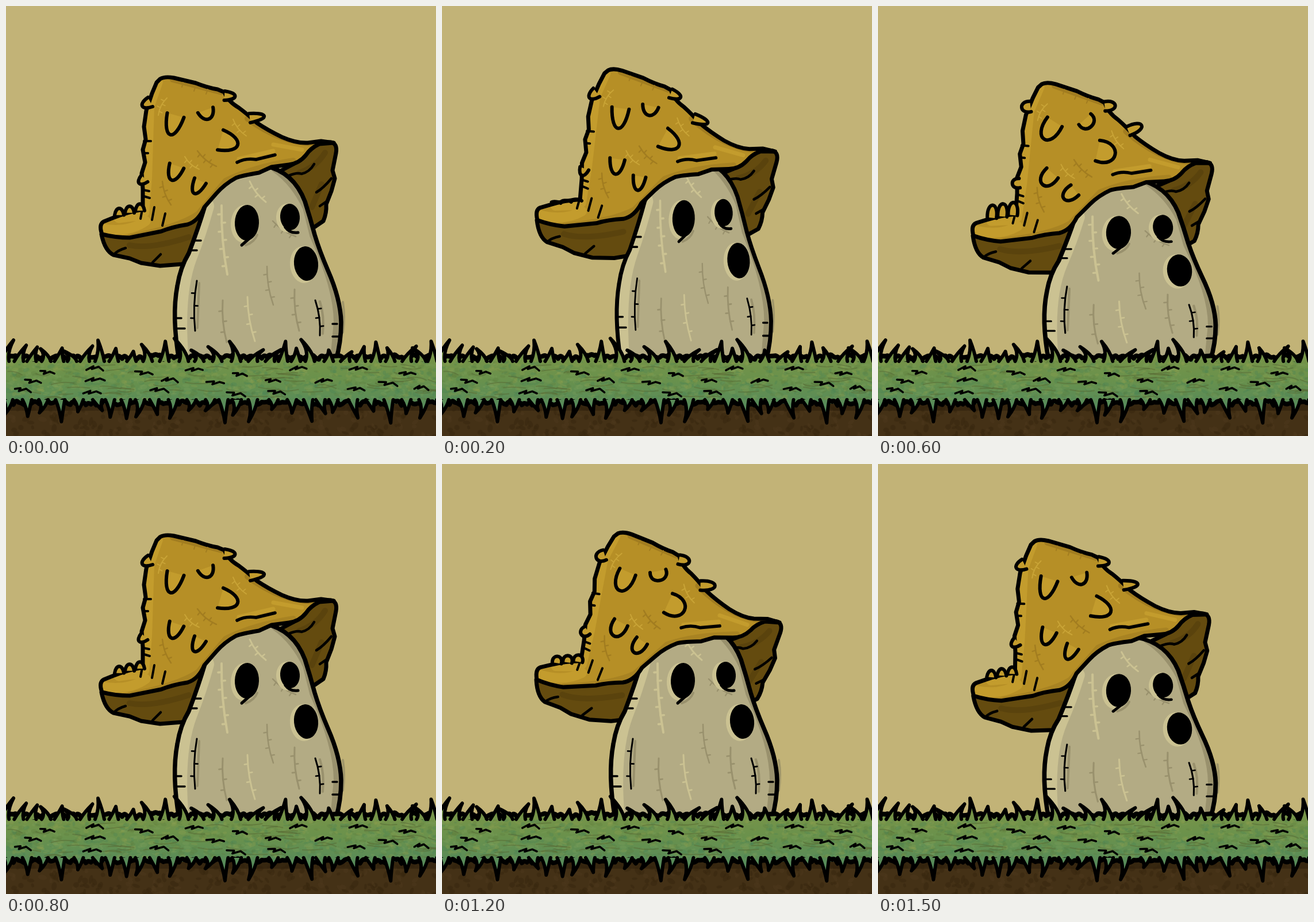
These frames come from a looping animation (748 px wide and 748 px high, 1.6 s). An HTML page with a canvas:

```html
<!DOCTYPE html>
<html lang="en">
<head>
<meta charset="utf-8">
<title>Bouncing mushroom</title>
<style>
html, body { margin: 0; height: 100%; overflow: hidden; background: #c2b377; }
canvas { display: block; }
</style>
</head>
<body>
<canvas id="stage" width="748" height="748"></canvas>
<script>
const SIZE = 748, STEP = 100, STEPS = 8;
const view = document.getElementById('stage').getContext('2d');
let g = view;

const fill = (d, color) => { g.fillStyle = color; g.fill(new Path2D(d)); };
const line = (d, width, color = '#000') => {
  g.lineWidth = width;
  g.lineCap = g.lineJoin = 'round';
  g.strokeStyle = color;
  g.stroke(new Path2D(d));
};
const oval = (x, y, rx, ry, color, turn = 0) => {
  g.fillStyle = color;
  g.beginPath();
  g.ellipse(x, y, rx, ry, turn, 0, 7);
  g.fill();
};
// Runs paint() and puts the transform and clip back afterwards.
const scoped = paint => { g.save(); paint(); g.restore(); };

// A bent scratch with short ticks on alternating sides.
function crack(x1, y1, x2, y2, color, ticks = 4, width = 3) {
  const dx = x2 - x1, dy = y2 - y1, len = Math.hypot(dx, dy);
  const nx = -dy / len, ny = dx / len;
  line(`M${x1} ${y1}Q${x1 + dx / 2 + nx * 6} ${y1 + dy / 2 + ny * 6} ${x2} ${y2}`, width, color);
  for (let i = 1; i <= ticks; i++) {
    const p = i / (ticks + 1), side = i % 2 ? 6 : -6, bend = 12 * p * (1 - p);
    line(`M${x1 + dx * p + nx * bend} ${y1 + dy * p + ny * bend}l${nx * side} ${ny * side}`, width * .9, color);
  }
}

// The body holds each scale for two steps: middle, tall, middle, squashed.
const bodyScale = step => [[1, 1], [.928, 1.03], [1, 1], [1.03, .93]][step >> 1];

// Peak, left brim and right tip circle once per cycle; the tip also rides on the body.
function hatFrame(step) {
  const angle = step / STEPS * 2 * Math.PI, c = Math.cos(angle), s = Math.sin(angle);
  const drop = (1 - bodyScale(step)[1]) * 320;
  const px = 288 - 19 * c + 2 * s, py = 124 + 3 * c - 12 * s;
  const lx = 165 + c, ly = 386 + 11 * c - 13.5 * s;
  const tx = 581 - 8.5 * c + s, ty = 257 - 19 * c + 6 * s + drop;
  return new DOMMatrix([tx - px, ty - py, lx - px, ly - py, px, py]);
}
const restInverse = hatFrame(0).inverse();

const cap = 'M268 127Q276 122 292 125L330 134Q350 142 368 145L380 150Q386 166 405 177Q420 188 436 203Q455 216 480 228Q505 239 525 238L548 235L570 238L545 240Q530 247 522 259Q510 274 492 276L462 280L440 290Q410 295 400 299Q380 310 366 326L345 350Q335 374 316 380Q290 384 270 392L215 403Q190 403 167 397Q161 380 170 375L185 369Q212 358 238 354L238 318L236 291L242 272L238 250L243 232L240 210L244 182L254 152L262 133Z';
const underside = 'M166 397Q172 426 187 433L215 439L235 447L268 452L306 449L530 389L552 374Q558 360 557 345L566 322L572 300L568 286L574 256Q577 239 565 237L545 237L500 275L300 380Z';
const bodyShape = 'M301 616Q288 540 298 487Q303 455 318 430Q335 385 346 348Q385 270 450 278Q500 288 520 340Q529 368 537 398Q545 425 560 460Q582 510 583 550Q583 585 574 616';
const LIGHT = '#cbc292', SHADE = '#99916d', GOLD = '#b68f26', GLOW = '#c39c2d', DUSK = '#a27d20';

function drawUnderside() {
  fill(underside, '#644b0f');
  line('M215 416Q250 424 318 402M510 290Q540 280 555 255M549 310L532 350', 10, '#5a430d');
  line(underside, 7);
  line('M187 433Q194 425 208 421M255 446L269 432M490 296Q506 289 514 292Q528 289 536 275M540 324Q552 317 566 300M546 348L559 339', 4.5);
}

function eye(x, y, rx, ry, turn) {
  oval(x - 5, y + 2, rx + 2, ry + 2, LIGHT, turn);
  oval(x, y, rx, ry, '#000', turn);
}

function drawBody() {
  line('M586 515Q590 540 586 568', 4, '#a0966a');
  fill(bodyShape, '#b3ab84');
  scoped(() => {
    g.clip(new Path2D(bodyShape));
    line('M348 348Q335 395 319 435Q294 500 304 616', 28, LIGHT);
    line('M470 280Q505 305 526 350L538 398Q580 490 580 550L574 616', 20, SHADE);
  });
  line(bodyShape, 7.5);

  crack(375, 347, 385, 467, LIGHT, 7, 4);
  crack(424, 305, 452, 341, LIGHT, 4);
  crack(420, 506, 433, 583, LIGHT, 4);
  crack(454, 453, 465, 520, SHADE, 4, 2.5);
  crack(377, 512, 384, 585, SHADE, 3);
  crack(502, 493, 510, 565, SHADE, 4);
  crack(464, 374, 504, 401, SHADE, 5, 2.5);
  line('M336 482L333 560M546 514Q554 538 551 570', 4, SHADE);
  crack(332, 478, 329, 565, '#000', 3);
  crack(546, 573, 538, 512, '#000', 3);
  line('M326 408h13M323 425h9M296 543h9M297 561h14M576 553h-8M580 575h-12', 3.5);

  eye(419, 377, 21, 31, .04);
  eye(494, 367, 17, 23, -.08);
  eye(522, 448, 21, 30, -.1);
  line('M437 398Q432 411 417 416', 4, SHADE);
  line('M426 402L410 416M486 385Q494 396 508 394', 5);
}

// Flaps on the hat: root x, y, half width, length, resting angle, swing per lift.
const flaps = [
  [295, 190, 15, 36, 0, 1], [347, 181, 14, 17, 10, -2], [373, 233, 18, 32, -65, -.6],
  [297, 278, 13, 27, 0, 1.3], [338, 304, 11, 25, 0, 1.7],
  [380, 156, 8, 19, -72, -1], [424, 195, 8, 26, -75, -1.5],
  [251, 167, 9, 16, 45, 1.2], [241, 300, 8, 13, 10, 2.5]
];
function drawFlap(x, y, half, length, degrees, pinch) {
  const d = `M${-half} 0C${-half * pinch} ${length * 1.3} ${half * pinch} ${length * 1.3} ${half} 0`;
  scoped(() => {
    g.translate(x, y);
    g.rotate(degrees * Math.PI / 180);
    fill(d, GLOW);
    line(d, 6);
  });
}

function drawCap() {
  fill(cap, GOLD);
  scoped(() => {
    g.clip(new Path2D(cap));
    line('M266 132L251 175L247 300L242 360', 14, GLOW);
    line('M172 388Q215 394 243 374M196 369L235 364', 17, GLOW);
    line('M290 128L375 150M420 196Q480 240 538 239', 10, DUSK);
    line('M215 402Q300 385 334 362L382 304Q430 280 500 269', 10, '#a88322');
    line('M405 266L465 252M465 241L515 250', 7, GLOW);
  });
  line(cap, 7);
  crack(280, 160, 265, 190, '#c9a437', 4, 2);
  crack(311, 262, 336, 284, '#c9a437', 4, 2);
  crack(395, 197, 418, 226, '#c9a437', 4, 2);
  crack(333, 252, 366, 279, DUSK, 5, 2.5);
  crack(272, 305, 287, 346, DUSK, 4, 2.5);
  line('M308 133l-2 8M330 139l-3 9M351 145l-3 8', 2, DUSK);
  line('M402 272Q417 264 435 267L468 259', 5.5);
  line('M240 235h12M240 256h7M239 320l10 2M240 331l10 3M239 344L234 370M258 350L254 372M277 361L272 382', 4);
}

function drawHat(step) {
  // Flaps hold for two steps, one step ahead of the body: they lift as the hat falls.
  const pair = (step + 1 >> 1) % 4;
  const lift = 15 - 13 * Math.sin(pair * Math.PI / 2);
  const pinch = pair < 2 ? .7 : 1.3;
  drawCap();
  for (const [x, y, half, length, rest, swing] of flaps)
    drawFlap(x, y, half, length, rest + lift * swing, pinch);
  for (let x = 197; x < 236; x += 18)
    drawFlap(x, 405 - x * .21, 8, lift * .8, 180, pinch);
}

function makeGround() {
  const layer = document.createElement('canvas');
  layer.width = layer.height = SIZE;
  g = layer.getContext('2d');
  let seed = 11;
  const rnd = (a, b) => {
    seed = seed * 16807 % 2147483647;
    return a + (b - a) * seed / 2147483647;
  };
  const green = g.createLinearGradient(0, 605, 0, 695);
  green.addColorStop(0, '#789448');
  green.addColorStop(.5, '#69914c');
  green.addColorStop(1, '#578b5a');

  g.fillStyle = '#443116';
  g.fillRect(0, 685, SIZE, 63);
  for (let i = 0; i < 260; i++)
    oval(rnd(0, SIZE), rnd(692, 750), rnd(2, 8), rnd(2, 5), i % 3 ? '#38270f88' : '#4c391c88', rnd(0, 3));
  line('M0 698H748', 12, '#2f200d99');

  const rough = y => {
    let d = `M-5 ${y}`;
    for (let x = -5; x < SIZE; x += 9) d += `Q${x + 4} ${y + rnd(-8, 3)} ${x + 9} ${y + rnd(-3, 4)}`;
    return d;
  };
  const top = rough(611), bottom = rough(691);
  fill(top + 'L755 692L-5 692Z', green);
  const tints = ['#93a04f44', '#44805544', '#7ea35c44', '#5c7c3b44'];
  for (let i = 0; i < 1000; i++)
    oval(rnd(0, SIZE), rnd(617, 688), rnd(2, 7), rnd(1, 4), tints[i % 4], rnd(-.5, .5));
  for (let i = 0; i < 70; i++)
    line(`M${rnd(0, SIZE)} ${rnd(622, 684)}q${rnd(8, 20)} ${rnd(-7, 7)} ${rnd(22, 42)} ${rnd(-4, 6)}`, 2, '#596b3688');
  line(top, 8);
  line(bottom, 8);

  // Curved blades along an edge: down is -1 for the tips above, 1 for the tips below.
  const blades = (y, down, gap, tall, lean) => {
    for (let x = rnd(-5, 8); x < SIZE + 10; x += rnd(gap * .7, gap * 1.3)) {
      const tip = x + rnd(-lean, lean), end = y + down * rnd(tall * .35, tall), mid = y + (end - y) * .4;
      const d = `M${x - 8} ${y - down * 3}Q${x - 1} ${mid} ${tip} ${end}Q${x + 5} ${mid} ${x + 8} ${y - down * 3}`;
      fill(d, green);
      line(d, 6);
    }
  };
  blades(615, -1, 27, 38, 20);
  blades(688, 1, 30, 38, 9);

  // Loose tufts inside the turf, in three rows.
  for (let row = 0; row < 3; row++)
    for (let x = rnd(10, 60); x < SIZE; x += rnd(60, 140))
      line(`M${x} ${636 + row * 17 + rnd(-4, 4)}l${rnd(8, 14)} ${rnd(-7, 2)}l-3 5l${rnd(10, 15)} -4l8 ${rnd(2, 7)}`, 3.5);
  g = view;
  return layer;
}
const ground = makeGround();

function draw(now) {
  const step = Math.floor(now / STEP) % STEPS;
  const hatMove = hatFrame(step).multiply(restInverse);
  g.fillStyle = '#c2b377';
  g.fillRect(0, 0, SIZE, SIZE);
  scoped(() => {
    g.setTransform(hatMove);
    drawUnderside();
  });
  scoped(() => {
    g.translate(437, 620);
    g.scale(...bodyScale(step));
    g.translate(-437, -620);
    drawBody();
  });
  scoped(() => {
    g.setTransform(hatMove);
    drawHat(step);
  });
  g.drawImage(ground, 0, 0);
  requestAnimationFrame(draw);
}
draw(0);
</script>
</body>
</html>
```
